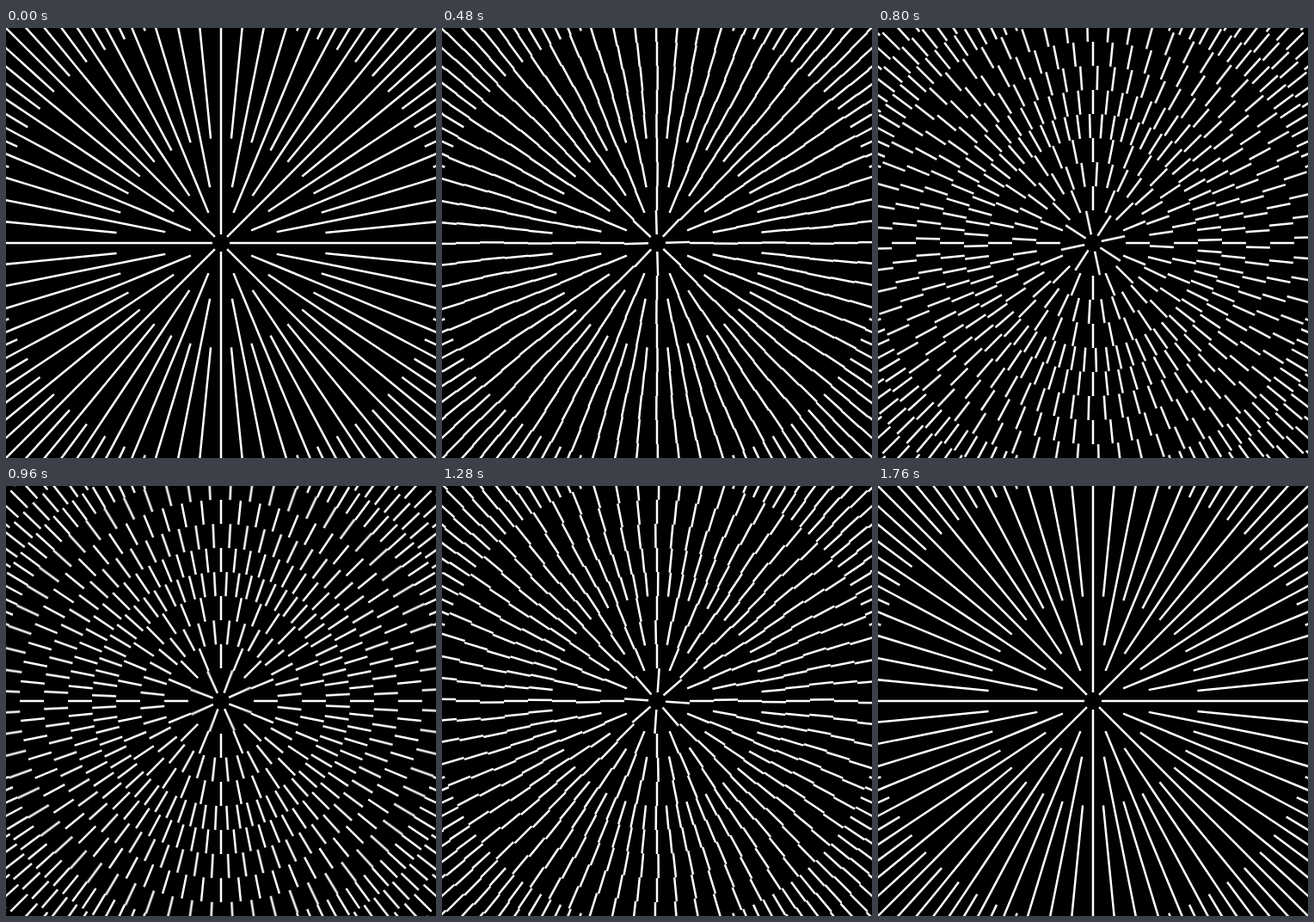
Recreate the animation shown at these times as an HTML page with a canvas. Size 500 by 500 pixels, loop 1.92 s.

```html
<!DOCTYPE html>
<html lang="en">
<head>
<meta charset="utf-8">
<title>Radial rings</title>
<style>
  html, body { margin: 0; width: 100%; height: 100%; overflow: hidden; background: #000; }
  canvas { display: block; width: 500px; height: 500px; }
</style>
</head>
<body>
<canvas id="stage" width="500" height="500"></canvas>
<script>
const ctx = document.getElementById('stage').getContext('2d');
const SIZE = 500, LOOP = 1920, FRAME = 40, FRAMES = LOOP / FRAME;
const INNER = 10, STEP = 28, RINGS = 13, BLUR_SAMPLES = 5;
const DOUBLE_AT = [1, 2, 4, 9]; // rings where the spoke count doubles

const spokeCount = ring => 8 * 2 ** DOUBLE_AT.filter(n => ring >= n).length;
const ease = p => p < 0.5 ? 8 * p ** 4 : 1 - 8 * (1 - p) ** 4;

function drawRing(ring, turn, alpha) {
  const count = spokeCount(ring);
  const r0 = INNER + ring * STEP, r1 = r0 + STEP;
  ctx.globalAlpha = alpha;
  ctx.beginPath();
  for (let i = 0; i < count; i++) {
    const angle = (i + turn) / count * Math.PI * 2;
    const c = Math.cos(angle), s = Math.sin(angle);
    ctx.moveTo(r0 * c, r0 * s);
    ctx.lineTo(r1 * c, r1 * s);
  }
  ctx.stroke();
}

function draw(time) {
  const frame = Math.floor((time % LOOP) / FRAME);
  ctx.setTransform(1, 0, 0, 1, 0, 0);
  ctx.globalCompositeOperation = 'source-over';
  ctx.globalAlpha = 1;
  ctx.fillStyle = '#000';
  ctx.fillRect(0, 0, SIZE, SIZE);

  ctx.translate(SIZE / 2, SIZE / 2);
  ctx.globalCompositeOperation = 'lighter';
  ctx.strokeStyle = '#fff';
  ctx.lineWidth = 2.5;
  for (let ring = 0; ring < RINGS; ring++) {
    if (ring % 2) {
      drawRing(ring, 0, 1);
      continue;
    }
    // Even rings turn by one spoke, in alternating directions, with motion blur.
    const direction = ring % 4 ? 1 : -1;
    for (let k = 0; k < BLUR_SAMPLES; k++) {
      const p = (frame + (k + 0.5) / BLUR_SAMPLES) / FRAMES;
      drawRing(ring, direction * ease(p), 1 / BLUR_SAMPLES);
    }
  }
}

const start = performance.now();
function tick() {
  draw(performance.now() - start);
  requestAnimationFrame(tick);
}
tick();
</script>
</body>
</html>
```
